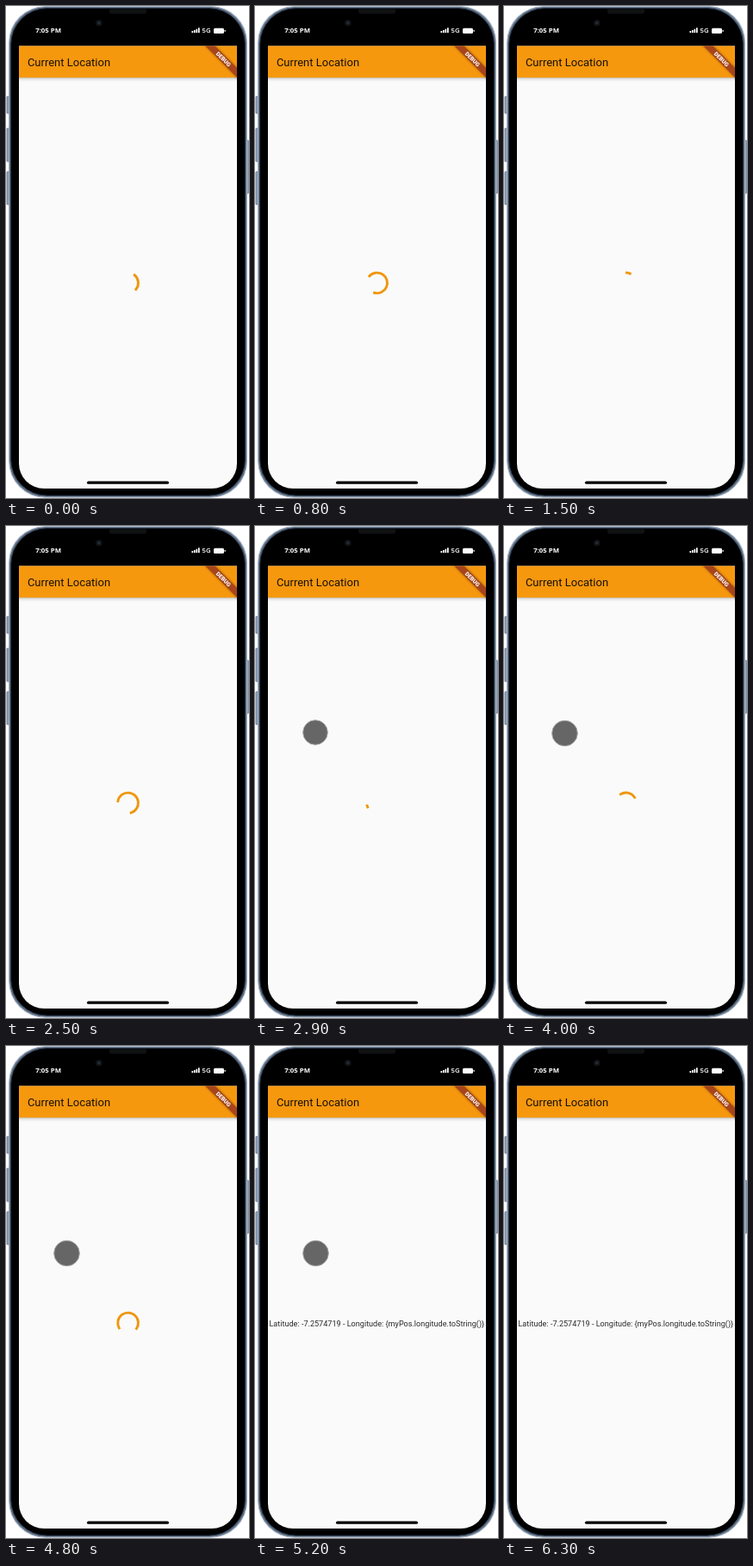
These frames come from a looping animation (282x572 px, 7000 ms). An HTML page:

```html
<!DOCTYPE html>
<html lang="en">
<head>
<meta charset="utf-8">
<title>Current Location</title>
<style>
  html, body { margin: 0; width: 100%; height: 100%; overflow: hidden; background: #fff; }
  svg { display: block; width: 282px; height: 572px; }
  text { font-family: Roboto, sans-serif; }
  .status { font: 700 7.8px "Open Sans", sans-serif; fill: #fff; }
</style>
</head>
<body>
<svg viewBox="0 0 282 572">
  <defs>
    <clipPath id="screen">
      <path d="M15 46.400H268V532A29 29 0 0 1 239 561H44A29 29 0 0 1 15 532Z"/>
    </clipPath>
    <linearGradient id="shade" x2="0" y2="1">
      <stop offset="0" stop-opacity=".24"/>
      <stop offset=".4" stop-opacity=".08"/>
      <stop offset="1" stop-opacity="0"/>
    </linearGradient>
    <filter id="blur" x="-20%" y="-80%" width="140%" height="260%">
      <feGaussianBlur stdDeviation="1.6"/>
    </filter>
  </defs>

  <!-- phone body -->
  <g fill="#8c9db1" stroke="#4a5b6e" stroke-width=".5">
    <rect x=".9" y="105" width="3.400" height="20" rx="1"/>
    <rect x=".9" y="142" width="3.400" height="39" rx="1"/>
    <rect x=".9" y="192.500" width="3.400" height="38.500" rx="1"/>
    <rect x="279" y="156" width="2.500" height="62" rx="1"/>
  </g>
  <rect x="3.700" y=".7" width="275.800" height="570.400" rx="42" fill="#596b80" stroke="#a3b0c0" stroke-width="1.100"/>
  <rect x="5.700" y="2.600" width="271.800" height="566.600" rx="42" stroke="#263447" stroke-width="1"/>
  <path d="M120 3.500H163V6.500Q163 9 160 9H123Q120 9 120 6.500Z" fill="#101113"/>
  <circle cx="107.800" cy="19.700" r="3.800" fill="#111316"/>
  <circle cx="107.800" cy="19.700" r="1.600" fill="#282e38"/>

  <!-- status bar -->
  <text class="status" x="34.200" y="30.700">7:05 PM</text>
  <text class="status" x="227.600" y="31" style="font-weight:600">5G</text>
  <g fill="#fff">
    <rect x="215.500" y="29" width="1.700" height="2.200"/>
    <rect x="218" y="28" width="1.700" height="3.200"/>
    <rect x="220.500" y="26.700" width="1.700" height="4.500"/>
    <rect x="223" y="25.300" width="1.700" height="5.900"/>
    <rect x="241" y="25.700" width="12" height="6.400" rx="1.600"/>
    <rect x="253.600" y="27.800" width="1" height="2.200" rx=".5"/>
  </g>

  <!-- app -->
  <g clip-path="url(#screen)">
    <rect x="14" y="46" width="255" height="516" fill="#fafafa"/>
    <rect x="14" y="83" width="255" height="5" fill="url(#shade)"/>
    <rect x="14" y="46" width="255" height="37.200" fill="#f6980e"/>
    <text x="24.900" y="69.800" font-size="13" fill="#1a1106">Current Location</text>
    <g transform="translate(268 46.200) rotate(45)">
      <rect x="-30" y="18.200" width="60" height="7.800" opacity=".4" filter="url(#blur)"/>
      <rect x="-30" y="18.200" width="60" height="7.800" fill="#a8441a"/>
      <text y="24.400" font-size="6.600" font-weight="900" text-anchor="middle" fill="#fff">DEBUG</text>
    </g>
    <path id="arc" fill="none" stroke="#ee970f" stroke-width="2.900" stroke-linecap="square"/>
    <text id="result" x="141.300" y="325.500" font-size="9.100" text-anchor="middle" fill="#2a2a2a">Latitude: -7.2574719 - Longitude: {myPos.longitude.toString()}</text>
    <circle id="touch" fill="#666" stroke="#a2a2a2" stroke-width="1"/>
    <rect x="94" y="552.600" width="95" height="3.200" rx="1.600"/>
  </g>
</svg>
<script>
const LOOP = 7000, STEP = 100, DONE = 5200;
const CYCLE = 1333, TURN = 2222, PHASE = 0.715;
const CX = 141.6, CY = 322, R = 11.9;
// time, x, y, radius, opacity
const TOUCH = [
  [0, 70, 240, 14, 0],
  [2800, 70, 240, 14, 1],
  [2900, 70, 240, 14.3, 1],
  [3000, 70.5, 241, 14.8, 1],
  [6200, 70.5, 241, 14.3, 0.5],
  [6300, 70.5, 241, 14, 0]
];
const $ = id => document.getElementById(id);
const arc = $("arc"), result = $("result"), touch = $("touch");

const set = (el, attrs) => {
  for (const k in attrs) el.setAttribute(k, attrs[k]);
};

// cubic-bezier(.4, 0, .2, 1)
function ease(x) {
  if (x <= 0) return 0;
  if (x >= 1) return 1;
  let lo = 0, hi = 1, s = 0.5;
  for (let i = 0; i < 24; i++) {
    s = (lo + hi) / 2;
    const q = 1 - s;
    if (1.2 * q * q * s + 0.6 * q * s * s + s ** 3 < x) lo = s;
    else hi = s;
  }
  return s * s * (3 - 2 * s);
}

function arcPath(t) {
  const u = PHASE + t / CYCLE, p = u % 1;
  const head = ease(p * 2), tail = ease(p * 2 - 1);
  const a = Math.PI * (-0.5 + 1.5 * tail + 0.5 * p + 2 * u * CYCLE / TURN);
  const sweep = Math.max(1.5 * Math.PI * (head - tail), 0.001);
  const at = v => `${(CX + R * Math.cos(v)).toFixed(3)} ${(CY + R * Math.sin(v)).toFixed(3)}`;
  return `M${at(a)}A${R} ${R} 0 ${+(sweep > Math.PI)} 1 ${at(a + sweep)}`;
}

function draw(ms) {
  const t = Math.floor((ms % LOOP) / STEP) * STEP;
  const loading = t < DONE;
  set(arc, { d: arcPath(t), visibility: loading ? "visible" : "hidden" });
  set(result, { visibility: loading ? "hidden" : "visible" });
  const [, cx, cy, r, opacity] = TOUCH.filter(k => k[0] <= t).pop();
  set(touch, { cx, cy, r, opacity });
}

const start = performance.now();
function tick() {
  draw(performance.now() - start);
  requestAnimationFrame(tick);
}
tick();
</script>
</body>
</html>
```
